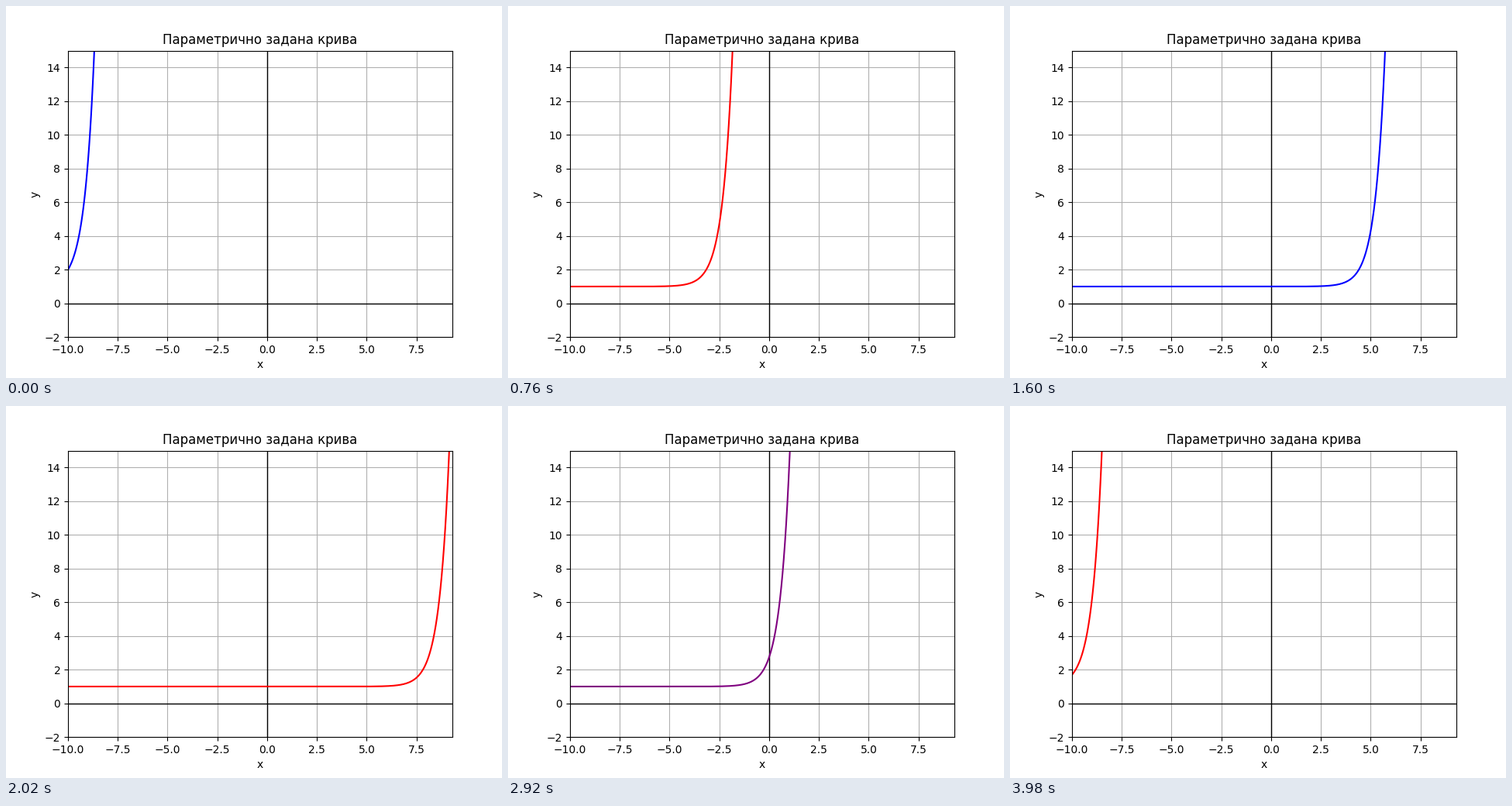
A matplotlib script for the animation above (4000 ms loop, 640 by 480 pixels).

```python
import numpy as np
import matplotlib.pyplot as plt
from matplotlib.animation import FuncAnimation

FRAMES = 200
HALF = FRAMES // 2
START, STEP = -10, 0.18
COLORS = ["blue", "red", "green", "purple"]
COLOR_HOLD = 20

fig, ax = plt.subplots(figsize=(6.4, 4.8), dpi=100)
ax.set_xlim(-10, 9.3)
ax.set_ylim(-2, 15)
ax.set_title("Параметрично задана крива")
ax.set_xlabel("x")
ax.set_ylabel("y")
ax.grid(True)
ax.axhline(0, color="black", linewidth=1)
ax.axvline(0, color="black", linewidth=1)
curve, = ax.plot([], [], linewidth=1.5)

x = np.linspace(-10, 10, 1000)


def update(i):
    # the curve slides right, then back along the same path
    shift = START + STEP * (HALF - abs(i - HALF))
    visible = x[x < shift + 2]
    curve.set_data(visible, 1 + np.exp(2 * (visible - shift)))
    curve.set_color(COLORS[i // COLOR_HOLD % len(COLORS)])
    return curve,


anim = FuncAnimation(fig, update, frames=FRAMES, interval=20,
                     repeat=True, repeat_delay=0)
plt.show()
```
